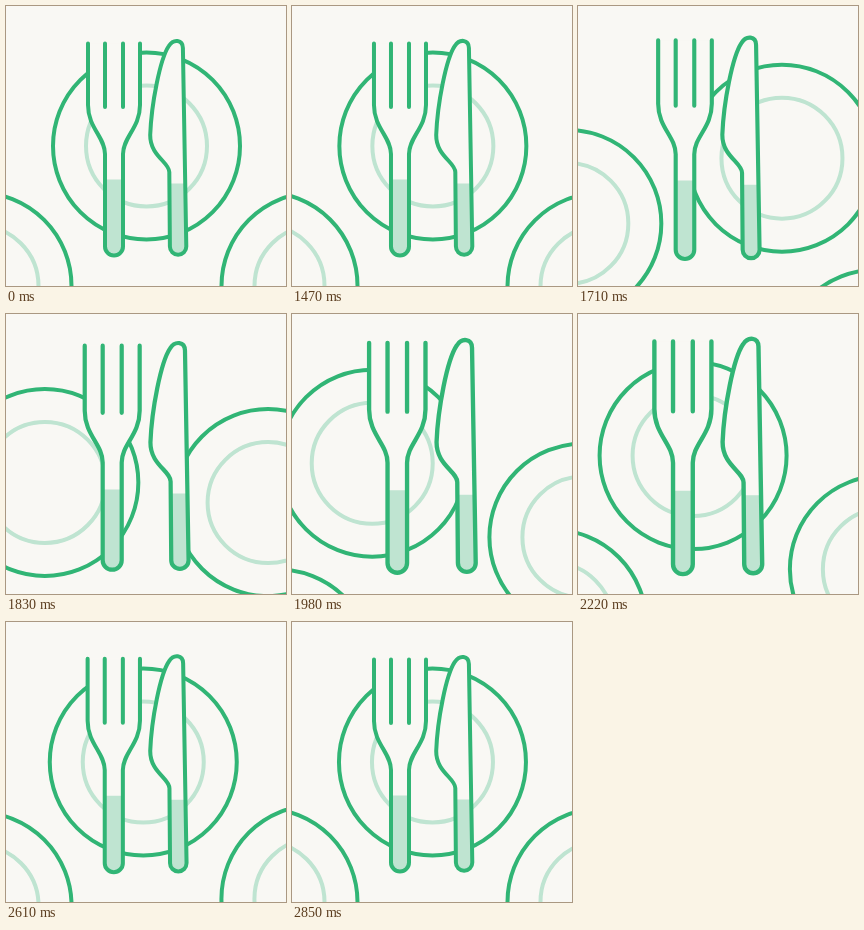
Recreate the animation shown at these times as an HTML page. Size 280 by 280 pixels, loop 2.88 s.

```html
<!DOCTYPE html>
<html lang="en">
<head>
<meta charset="utf-8">
<title>Fork, knife and plates</title>
<style>
  html, body { margin: 0; height: 100%; overflow: hidden; background: #f9f8f4; }
  svg { display: block; width: 100vw; height: 100vh; }
  .line { fill: none; stroke: #31b575; stroke-width: 4; stroke-linecap: round; stroke-linejoin: round; }
  .solid { fill: #f9f8f4; }
  .tint { fill: #bfe4d1; }
  .ring { fill: none; stroke: #bfe4d1; stroke-width: 4; }
</style>
</head>
<body>
<svg viewBox="0 0 280 280">
  <defs>
    <g id="plate">
      <circle class="line" r="93.5"/>
      <circle class="ring" r="60.5"/>
    </g>
    <path id="fork" d="M82 37.500V99C82 122 99 131 99 148V240.500a9 9 0 0 0 18 0V148C117 131 134 122 134 99V37.500"/>
    <path id="knife" d="M163.300 166C163.300 156 144 150 144.200 129C145.400 98 154 53 162.800 40C167.500 32.500 176.700 33.500 176.900 42L180.300 240.500a8.200 8.200 0 0 1-16.400 0Z"/>
  </defs>
  <g id="plates"></g>
  <g id="cutlery">
    <use href="#fork" class="solid"/>
    <path class="tint" d="M99 173.500V240.500a9 9 0 0 0 18 0V173.500Z"/>
    <use href="#fork" class="line"/>
    <path class="line" d="M99 37.500V101M117 37.500V101"/>
    <use href="#knife" class="solid"/>
    <path class="tint" d="M163.400 177.500L163.900 240.500a8.200 8.200 0 0 0 16.400 0L179.200 177.500Z"/>
    <use href="#knife" class="line"/>
  </g>
</svg>
<script>
  const LOOP = 2880, START = 1440, PEAK = 2160;
  const SVG = 'http://www.w3.org/2000/svg';
  const cutlery = document.getElementById('cutlery');

  // Each plate travels one quarter of a closed track per turn.
  const plates = [
    'M140.5 474C47 474 -28 365 -28 280',
    'M-28 280C-28 203 47.5 140 140.5 140',
    'M140.5 140C233.5 140 309 217 309 280',
    'M309 280C309 405 234 474 140.5 474'
  ].map(d => {
    const track = document.createElementNS(SVG, 'path');
    track.setAttribute('d', d);
    const node = document.createElementNS(SVG, 'use');
    node.setAttribute('href', '#plate');
    document.getElementById('plates').append(node);
    return { node, track, length: track.getTotalLength() };
  });

  // Cubic ease with flat ends; x1 and x2 are the handle times.
  function ease(x, x1, x2) {
    if (x <= 0) return 0;
    if (x >= 1) return 1;
    let lo = 0, hi = 1, s;
    for (let i = 0; i < 30; i++) {
      s = (lo + hi) / 2;
      const r = 1 - s;
      if (3 * r * r * s * x1 + 3 * r * s * s * x2 + s * s * s < x) lo = s; else hi = s;
    }
    return s * s * (3 - 2 * s);
  }

  function draw() {
    const t = performance.now() % LOOP;
    const turn = ease((t - START) / (LOOP - START), 1 / 3, 0);
    for (const { node, track, length } of plates) {
      const { x, y } = track.getPointAtLength(turn * length);
      node.setAttribute('transform', `translate(${x} ${y})`);
    }
    const grow = t < PEAK
      ? ease((t - START) / (PEAK - START), 1 / 3, 2 / 3)
      : 1 - ease((t - PEAK) / (LOOP - PEAK), 1 / 3, 0);
    cutlery.setAttribute('transform', `translate(140 140) scale(${1 + 0.1 * grow}) translate(-140 -140)`);
    requestAnimationFrame(draw);
  }
  draw();
</script>
</body>
</html>
```
